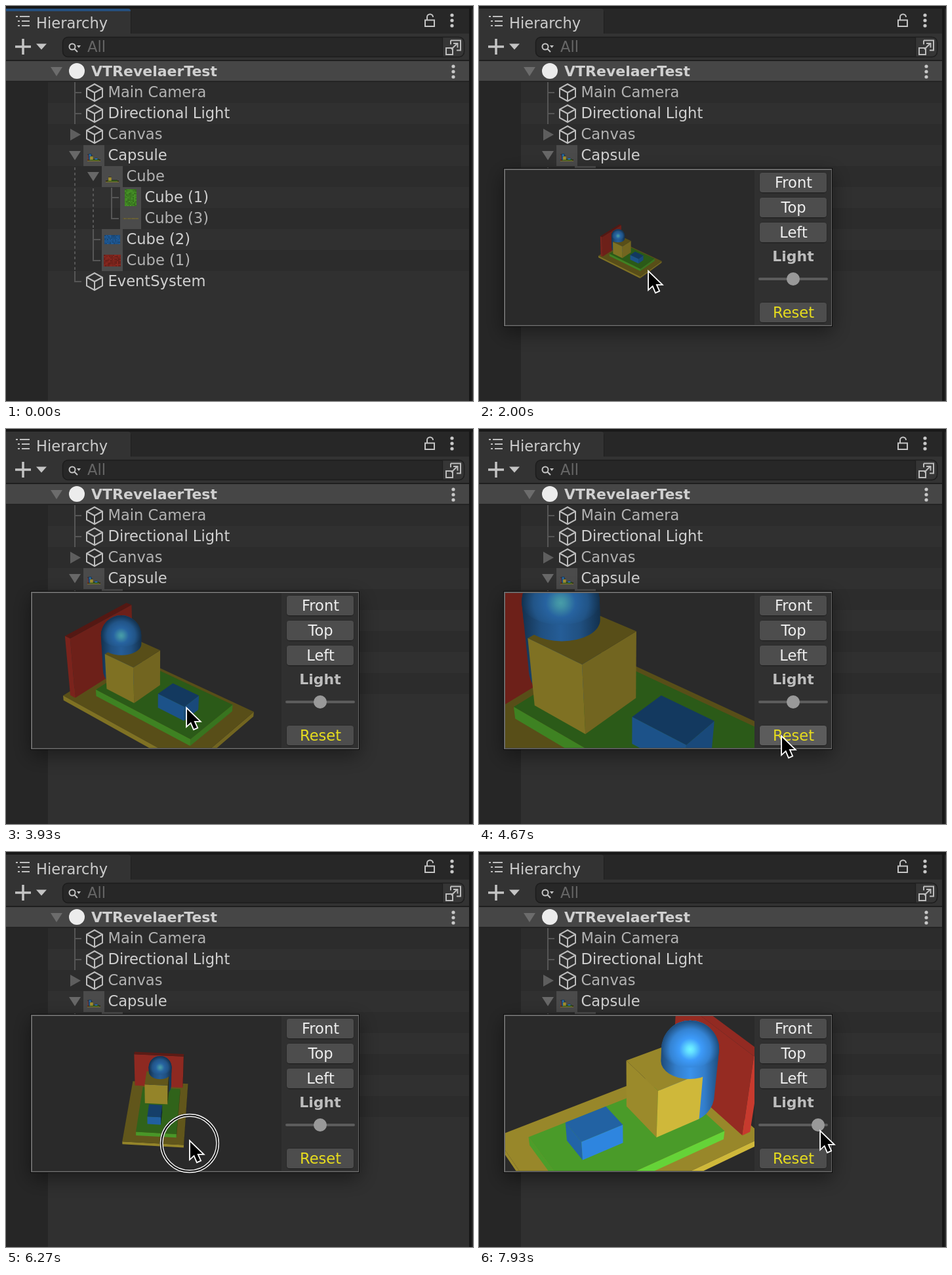
An HTML page with a canvas that plays this animation: 712 by 602 pixels, repeating every 8 s.

```html
<!DOCTYPE html>
<html lang="en">
<head>
<meta charset="utf-8">
<title>Hierarchy preview</title>
<style>
  html, body { margin: 0; width: 100%; height: 100%; overflow: hidden; background: #303030; }
  canvas { display: block; }
</style>
</head>
<body>
<canvas id="stage" width="712" height="602"></canvas>
<script>
const ctx = document.getElementById('stage').getContext('2d');
const LOOP = 8000, POPUP_AT = 740, RESET_AT = 4750;
const FOCAL = 1000, RAD = Math.PI / 180, TAU = Math.PI * 2;
const IDLE_LIGHT = .64;

const clamp = v => Math.max(0, Math.min(1, v));
// Half linear, half smooth progress of a gesture
function ramp(t, { from, to }) {
  const u = clamp((t - from) / (to - from));
  return .5 * u + .5 * u * u * (3 - 2 * u);
}

const span = (from, to) => ({ from, to });
const move = (from, to, x, y, press = false) => ({ from, to, x, y, press });
const firstDrag = move(5380, 5950, 45, 452, true);
const secondDrag = move(6220, 6650, 45, 440, true);
const slide = move(7600, 7850, 520, 425, true);
const GESTURES = [
  move(70, 600, 134, 228), move(640, 740, 134, 228, true), move(900, 1800, 258, 404),
  move(2600, 3200, 275, 425), move(4200, 4600, 461, 468), move(4680, 4840, 461, 468, true),
  move(4880, 5370, 280, 434), firstDrag, move(5960, 6210, 300, 440), secondDrag,
  move(6660, 6930, 282, 402), move(7280, 7560, 482, 418), slide
];

function cursorAt(t) {
  return GESTURES.reduce(([x, y], g) => {
    const u = ramp(t, g);
    return [x + (g.x - x) * u, y + (g.y - y) * u];
  }, [640, 462]);
}

function cameraAt(t) {
  const a = ramp(t, firstDrag), b = ramp(t, secondDrag);
  const zoom = t < RESET_AT
    ? 2.61 * ramp(t, span(3530, 4200))
    : .8 * ramp(t, span(5020, 5350)) + .52 * ramp(t, span(6730, 6950)) + .81 * ramp(t, span(7040, 7280));
  return { azimuth: 50 - 50 * a - 58 * b, elevation: 34 + 5 * a, distance: 49 / 2 ** zoom };
}

const COLORS = {
  yellow: [208, 185, 58], green: [102, 212, 56], blue: [46, 134, 224], red: [200, 58, 46]
};
// Center on the ground, footprint, bottom and height
const box = (color, x, z, w, d, y, h) => ({
  color: COLORS[color],
  r: [[x - w / 2, x + w / 2], [y, y + h], [z - d / 2, z + d / 2]]
});
const BASE = box('yellow', 0, 0, 4.1, 2.56, -1.15, .15);
const LAWN = box('green', .12, -.1, 3.02, 1.7, -1, .2);
const WALL = box('red', -1.83, .05, .18, 2.2, -1, 1.76);
const BLOCK = box('yellow', -.735, .05, .93, 1, -.8, 1.05);
const BRICK = box('blue', .7, .03, .8, .57, -.8, .42);
const CAPSULE = { x: -1.2, z: -.05 };

function rect(x, y, w, h, fill) { ctx.fillStyle = fill; ctx.fillRect(x, y, w, h); }

function round(x, y, w, h, r, fill, stroke) {
  ctx.beginPath();
  ctx.roundRect(x, y, w, h, r);
  ctx.fillStyle = fill;
  ctx.fill();
  if (stroke) { ctx.strokeStyle = stroke; ctx.lineWidth = 1.5; ctx.stroke(); }
}

function disc(x, y, r, fill) {
  ctx.beginPath();
  ctx.arc(x, y, r, 0, TAU);
  ctx.fillStyle = fill;
  ctx.fill();
}

function ring(x, y, r, width, color) {
  ctx.beginPath();
  ctx.arc(x, y, r, 0, TAU);
  ctx.strokeStyle = color;
  ctx.lineWidth = width;
  ctx.stroke();
}

function poly(points, fill) {
  ctx.beginPath();
  points.forEach(p => ctx.lineTo(p[0], p[1]));
  ctx.closePath();
  ctx.fillStyle = fill;
  ctx.fill();
}

function lines(d, color, width = 2) {
  ctx.strokeStyle = color;
  ctx.lineWidth = width;
  ctx.stroke(new Path2D(d));
}

function text(s, x, y, color, bold, align = 'left') {
  ctx.font = `${bold ? 'bold 22px' : '22.6px'} "DejaVu Sans", Verdana, sans-serif`;
  ctx.textAlign = align;
  ctx.fillStyle = color;
  ctx.fillText(s, x, y);
}

const downArrow = (x, y, w, h, c) => poly([[x - w / 2, y - h / 2], [x + w / 2, y - h / 2], [x, y + h / 2]], c);
const kebab = (x, y) => [-8, 0, 8].forEach(d => disc(x, y + d, 2.6, '#c8c8c8'));
const tint = (c, m) => `rgb(${c.map(v => Math.min(255, Math.round(v * m)))})`;

function makeView({ azimuth, elevation, distance }, light, cx = 230, cy = 368) {
  const a = azimuth * RAD, e = elevation * RAD, sunE = e - 12 * RAD;
  const [ca, sa, ce, se] = [Math.cos(a), Math.sin(a), Math.cos(e), Math.sin(e)];
  return {
    light, se,
    sun: [Math.cos(sunE) * ca, Math.sin(sunE), Math.cos(sunE) * sa],
    project([x, y, z]) {
      const near = x * ca + z * sa, k = FOCAL / (distance - near * ce - y * se);
      return [cx + (x * sa - z * ca) * k, cy - (y * ce - near * se) * k, k];
    }
  };
}

function drawBox({ color, r }, view) {
  for (let axis = 0; axis < 3; axis++) for (const side of [0, 1]) {
    const u = (axis + 1) % 3, v = (axis + 2) % 3;
    const pts = [[0, 0], [1, 0], [1, 1], [0, 1]].map(([i, j]) => {
      const p = [];
      p[axis] = r[axis][side]; p[u] = r[u][i]; p[v] = r[v][j];
      return view.project(p);
    });
    const [p, q, s] = pts;
    const turn = (q[0] - p[0]) * (s[1] - p[1]) - (q[1] - p[1]) * (s[0] - p[0]);
    if ((side ? -turn : turn) <= 0) continue;
    const lit = Math.max(0, view.sun[axis] * (side ? 1 : -1));
    poly(pts, tint(color, view.light * (.33 + .88 * lit)));
  }
}

// The part of the capsule above cutY; a cut inside the block shows as an ellipse
function drawCapsule(view, cutY) {
  const [x, y, k] = view.project([CAPSULE.x, .5, CAPSULE.z]), r = k / 2;
  const [bx, by, bk] = view.project([CAPSULE.x, cutY, CAPSULE.z]), br = bk / 2;
  const blue = m => tint([60, 152, 245], view.light * m);
  const side = ctx.createLinearGradient(x - r, 0, x + r, 0);
  for (let i = 0; i <= 4; i++) side.addColorStop(i / 4, blue(.5 + .46 * Math.sin(i / 4 * Math.PI)));
  ctx.beginPath();
  ctx.arc(x, y, r, Math.PI, TAU);
  ctx.ellipse(bx, by, br, cutY > 0 ? br * view.se : br, 0, 0, Math.PI);
  ctx.closePath();
  ctx.fillStyle = side;
  ctx.fill();

  const dome = ctx.createRadialGradient(x, y, 0, x, y, r);
  dome.addColorStop(0, tint([112, 245, 262], view.light));
  dome.addColorStop(.12, tint([100, 225, 258], view.light));
  dome.addColorStop(.38, blue(1.02));
  dome.addColorStop(.7, blue(.86));
  dome.addColorStop(1, blue(.5));
  ctx.beginPath();
  ctx.arc(x, y, r, Math.PI, TAU);
  ctx.ellipse(x, y, r, r * view.se, 0, 0, Math.PI);
  ctx.fillStyle = dome;
  ctx.fill();
}

function scene(view) {
  [BASE, LAWN, WALL].forEach(b => drawBox(b, view));
  drawCapsule(view, -.5);
  drawBox(BLOCK, view);
  drawCapsule(view, BLOCK.r[1][1]);
  drawBox(BRICK, view);
}

function header(focused) {
  rect(0, 0, 712, 602, '#303030');
  rect(0, 0, 712, 42, '#272727');
  rect(0, 0, 712, 4, '#181818');
  round(0, 4, 190, 40, [0, 4, 0, 0], '#333333');
  if (focused) round(0, 4, 190, 4, [0, 4, 0, 0], '#26507f');
  rect(190, 8, 1, 34, '#1e1e1e');
  rect(0, 42, 706, 41, '#333333');
  lines('M15 16h3M21 16h15M18 23h3M24 23h12M18 30h3M24 30h12', '#c0c0c0');
  text('Hierarchy', 46, 34, '#cccccc');
  lines('M639 21.500h14v9.500h-14zM642 21v-4a4.500 4.500 0 0 1 9 0', '#c4c4c4');
  kebab(680, 22);
  lines('M14 62h24M26 50v24', '#c4c4c4', 3.5);
  downArrow(54, 62, 16, 9, '#c4c4c4');
  round(86.5, 47.5, 612, 30, 8, '#272727', '#1c1c1c');
  round(665.5, 47.5, 33, 30, [0, 8, 8, 0], '#363636', '#202020');
  ring(101, 62, 4.5, 2, '#c4c4c4');
  lines('M104.500 65.500l4.500 4.500', '#c4c4c4');
  downArrow(111, 62, 6, 4, '#c4c4c4');
  text('All', 124, 70, '#666666');
  lines('M678 52.500h15v15h-6M678 52.500v6M671 64h10v10h-10zM679 66l9-9M682 57h6.500v6.500', '#bcbcbc');
  rect(0, 82, 706, 2, '#1f1f1f');
  rect(0, 84, 706, 31, '#464646');
  rect(0, 114, 706, 2, '#242424');
  downArrow(77, 100, 18, 14, '#6c6c6c');
  disc(108, 99, 12, '#ececec');
  text('VTRevelaerTest', 130, 107, '#d0d0d0', true);
  kebab(682, 100);
}

function cubeIcon(x, y) {
  lines(`M${x} ${y - 13}l12 6.500v13l-12 6.500l-12-6.500v-13zM${x - 12} ${y - 6.5}l12 6.500l12-6.500M${x} ${y}v13`, '#bdbdbd');
}

// Flat thumbnail with a seeded grain
const flat = (color, w, h) => (x, y) => {
  const c = COLORS[color];
  let seed = 7;
  for (let i = 0; i < w; i += 2) for (let j = 0; j < h; j += 2) {
    seed = seed * 16807 % 2147483647;
    rect(x - w / 2 + i, y - h / 2 + j, 2, Math.min(2, h - j), tint(c, .5 + .2 * seed / 2147483647));
  }
};
const small = paint => (x, y) => paint(makeView({ azimuth: 90, elevation: 8, distance: 205 }, IDLE_LIGHT, x, y + 2));

const ROWS = [
  ['Main Camera', 0], ['Directional Light', 0], ['Canvas', 0],
  ['Capsule', 0, small(scene)],
  ['Cube', 1, small(view => [BASE, LAWN, BLOCK].forEach(b => drawBox(b, view)))],
  ['Cube (1)', 2, flat('green', 18, 26)],
  ['Cube (3)', 2, flat('yellow', 24, 1)],
  ['Cube (2)', 1, flat('blue', 24, 14)],
  ['Cube (1)', 1, flat('red', 26, 18)],
  ['EventSystem', 0]
];

function tree() {
  rect(0, 116, 64, 486, '#262626');
  ROWS.forEach(([name, depth, thumb], i) => {
    const y = 116 + i * 32, x = 118 + depth * 28;
    rect(64, y, 642, 32, i % 2 ? '#303030' : '#2c2c2c');
    if (thumb) {
      rect(x, y, 32, 32, '#4b4b4b');
      thumb(x + 16, y + 16);
    } else cubeIcon(135, y + 16);
    text(name, x + 37.5, y + 23, i % 2 ? '#d0d0d0' : '#b2b2b2');
  });
  lines('M105 116v64M105 132h10M105 164h10M105 404v16h10M133 340v48h11M133 356h11M161 277v47h11M161 292h11', '#565656');
  ctx.setLineDash([4, 4]);
  lines('M105 246v158M133 278v62', '#565656');
  ctx.setLineDash([]);
  poly([[98, 187], [98, 205], [114, 196]], '#5e5e5e');
  downArrow(105, 228, 18, 14, '#686868');
  downArrow(133, 260, 18, 14, '#686868');
  rect(706, 0, 4, 602, '#171717');
  rect(710, 6, 2, 596, '#2b2b2b');
}

function button(label, y, color, [mx, my]) {
  const hover = mx > 428 && mx < 530 && my > y && my < y + 30;
  round(427.5, y - .5, 103, 32, 5, '#232323');
  round(428, y, 102, 30, 4, hover ? '#5c5c5c' : '#4d4d4d');
  text(label, 479.5, y + 23, color, false, 'center');
}

function popup(t, mouse) {
  ctx.save();
  ctx.shadowColor = 'rgba(0,0,0,.42)';
  ctx.shadowBlur = 28;
  ctx.shadowOffsetY = 9;
  rect(37, 247, 502, 242, '#0c0c0c');
  ctx.restore();
  rect(38, 248, 500, 240, '#6a6a6a');
  rect(40, 250, 497, 236.5, '#303030');
  rect(40, 250, 380, 236, '#2a2a2a');

  const bright = ramp(t, slide);
  ctx.save();
  ctx.beginPath();
  ctx.rect(40, 250, 380, 236);
  ctx.clip();
  scene(makeView(cameraAt(t), IDLE_LIGHT + (1 - IDLE_LIGHT) * bright));
  ctx.restore();

  ['Front', 'Top', 'Left'].forEach((s, i) => button(s, 254 + i * 38, '#eeeeee', mouse));
  text('Light', 479, 389, '#bdbdbd', true, 'center');
  round(426, 414, 106, 4, 2, '#5c5c5c');
  disc(479 + 38 * bright, 416, 10, '#999999');
  button('Reset', 452, '#e6dc1e', mouse);
}

function pointer(t, [x, y]) {
  if (GESTURES.some(g => g.press && t >= g.from && t < g.to + 20)) {
    ring(x, y + 4, 43, 5, '#101010');
    ring(x, y + 4, 44.5, 1.4, '#f4f4f4');
    ring(x, y + 4, 41, 1.4, '#f4f4f4');
  }
  const arrow = new Path2D(`M${x + 1} ${y + 2}v25l6-5.500l4.500 10.500l4.500-2l-4.500-10h8z`);
  ctx.lineJoin = 'miter';
  ctx.strokeStyle = '#ffffff';
  ctx.lineWidth = 3.6;
  ctx.stroke(arrow);
  ctx.fillStyle = '#000000';
  ctx.fill(arrow);
}

function draw(t) {
  const mouse = cursorAt(t), open = t >= POPUP_AT;
  header(!open);
  tree();
  if (open) popup(t, mouse);
  if (t >= 70) pointer(t, mouse);
}

const start = performance.now();
function tick() {
  draw((performance.now() - start) % LOOP);
  requestAnimationFrame(tick);
}
tick();
</script>
</body>
</html>
```
